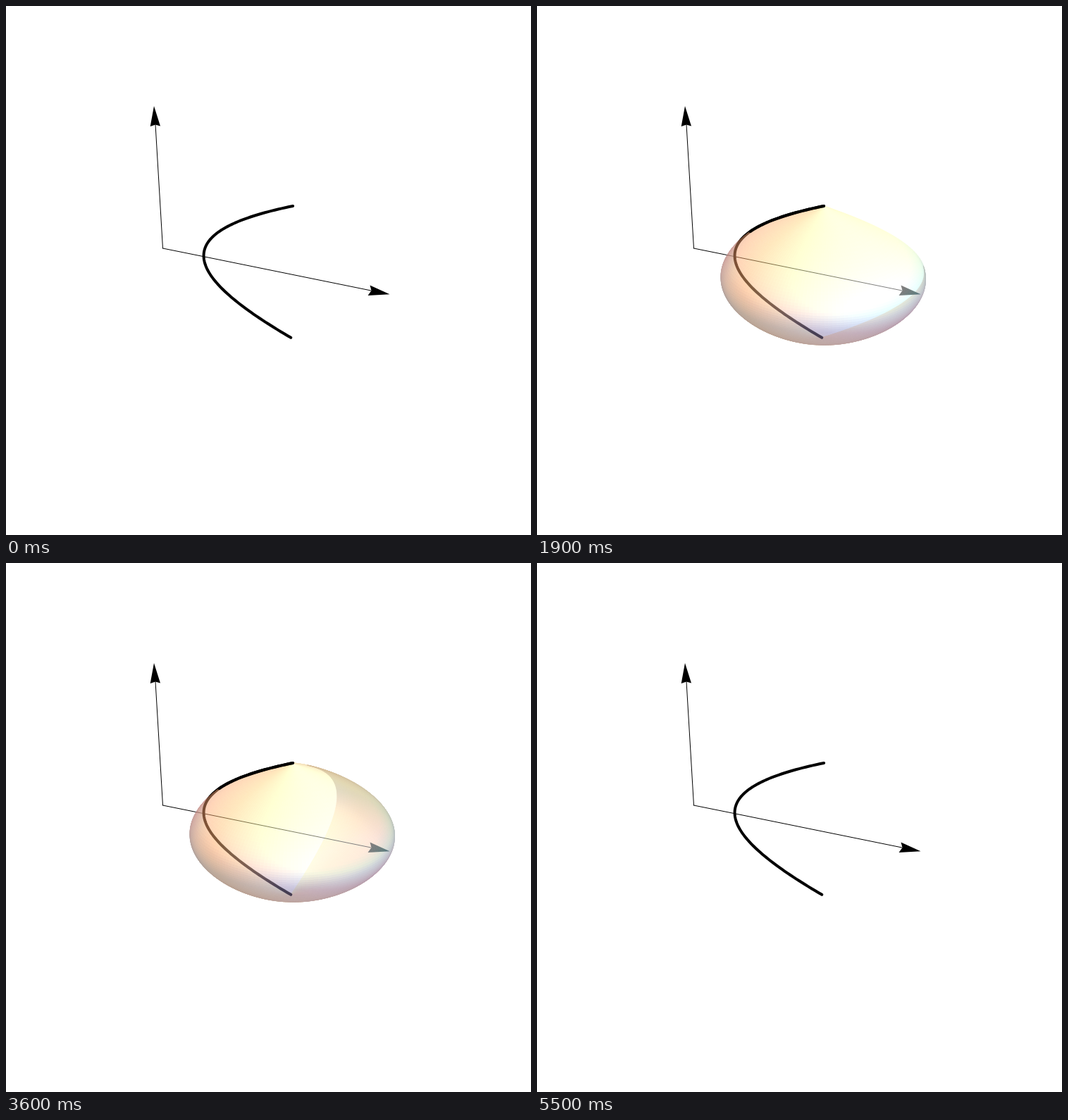
Animation, 745 px wide and 751 px high, one loop 6 s. Source, as an HTML page with a canvas:

```html
<!DOCTYPE html>
<html lang="en">
<head>
<meta charset="utf-8">
<title>Surface of revolution</title>
<style>
html, body { margin: 0; width: 100%; height: 100%; overflow: hidden; background: #fff; }
canvas { display: block; width: 745px; height: 751px; }
</style>
</head>
<body>
<canvas id="stage" width="745" height="751"></canvas>
<script>
const W = 745, H = 751, RAD = Math.PI / 180;
const ctx = document.getElementById('stage').getContext('2d');

// Camera: tilt, focal length, depth of the solid's centre, principal point
const TILT = 24.7 * RAD, FOCAL = 1107, DEPTH = 15.36, CX = 369, CY = 375.5;
const START = 205.9 * RAD, ZMAX = Math.SQRT2, ZSCALE = 1.01;
const SIN = Math.sin(TILT), COS = Math.cos(TILT);
const OPACITY = 0.5, ROWS = 64;

// World (right, near, height) to camera (right, up, toward the viewer)
const turn = (x, y, z) => [x, z * COS - y * SIN, z * SIN + y * COS];
const dot = (a, b) => a[0] * b[0] + a[1] * b[1] + a[2] * b[2];
const unit = v => { const n = Math.hypot(...v); return v.map(c => c / n); };

function place(x, y, z) {
  const p = turn(x, y, z * ZSCALE);
  return [p[0] + 0.509, p[1] - 0.0765, p[2]];
}
function project(p) {
  const s = FOCAL / (DEPTH - p[2]);
  return [CX + p[0] * s, CY - p[1] * s];
}
// Profile r = 2 - z^2 turned around the vertical line
function onSurface(angle, z) {
  const r = 2 - z * z;
  return place(r * Math.cos(angle), r * Math.sin(angle), z);
}
const normalAt = (angle, z) => unit(turn(Math.cos(angle), Math.sin(angle), 2 * z));
const facing = (n, p) => dot(n, [-p[0], -p[1], DEPTH - p[2]]) > 0;

const AMBIENT = [0.4, 0.2, 0.2];
const LIGHTS = [
  { dir: [1.5, -0.5, 1.5], rgb: [0, 0.18, 0.5] },
  { dir: [1.5, 1.5, 1.5], rgb: [0.18, 0.5, 0.18] },
  { dir: [-0.5, 1.5, 1.5], rgb: [0.5, 0.18, 0] }
].map(l => {
  const dir = unit(l.dir);
  return { dir, rgb: l.rgb, half: unit([dir[0], dir[1], dir[2] + 1]) };
});

function shade(n) {
  const c = AMBIENT.slice();
  for (const l of LIGHTS) {
    const k = Math.max(0, dot(n, l.dir)) + 0.5 * Math.max(0, dot(n, l.half)) ** 3;
    l.rgb.forEach((v, i) => c[i] += v * k);
  }
  return 'rgb(' + c.map(v => Math.round(255 * Math.min(1, 0.25 + 0.75 * v))) + ')';
}

function makeLayer() {
  const c = document.createElement('canvas');
  c.width = W;
  c.height = H;
  const g = c.getContext('2d');
  g.lineWidth = 0.8;
  g.lineJoin = 'round';
  return g;
}
const inner = makeLayer(), outer = makeLayer();

function trace(g, pts) {
  g.beginPath();
  pts.forEach((p, i) => i ? g.lineTo(p[0], p[1]) : g.moveTo(p[0], p[1]));
}

function buildSurface(sweep) {
  inner.clearRect(0, 0, W, H);
  outer.clearRect(0, 0, W, H);
  const cols = Math.ceil(sweep / (2 * RAD));
  const da = sweep / cols, dz = 2 * ZMAX / ROWS;
  for (let i = 0; i < cols; i++) {
    const a = START - i * da, b = a - da;
    for (let j = 0; j < ROWS; j++) {
      const z = -ZMAX + j * dz;
      let n = normalAt((a + b) / 2, z + dz / 2);
      const front = facing(n, onSurface((a + b) / 2, z + dz / 2));
      if (!front) n = n.map(v => -v);
      const g = front ? outer : inner;
      g.fillStyle = g.strokeStyle = shade(n);
      trace(g, [[a, z], [b, z], [b, z + dz], [a, z + dz]].map(q => project(onSurface(...q))));
      g.closePath();
      g.fill();
      g.stroke();
    }
  }
}

const profile = [], visible = [];
for (let i = 0; i <= 100; i++) {
  const z = ZMAX * (1 - i / 50), p = onSurface(START, z), q = project(p);
  profile.push(q);
  if (facing(normalAt(START, z), p)) visible.push(q);
}

function line(pts, width) {
  trace(ctx, pts);
  ctx.lineWidth = width;
  ctx.stroke();
}
function head(pts) {
  trace(ctx, pts);
  ctx.fill();
}
function blend(layer) {
  ctx.globalAlpha = OPACITY;
  ctx.drawImage(layer.canvas, 0, 0);
  ctx.globalAlpha = 1;
}

const ORIGIN = [222.5, 344], VERTEX = profile[50];

function draw(step) {
  const sweep = step ? 14.65 * (step - 0.92) * RAD : 0;
  ctx.fillStyle = '#fff';
  ctx.fillRect(0, 0, W, H);
  ctx.fillStyle = ctx.strokeStyle = '#000';
  ctx.lineCap = ctx.lineJoin = 'round';
  if (sweep) buildSurface(sweep);

  line([ORIGIN, [212, 168]], 1);
  head([[210, 142], [219, 170.5], [212, 168.5], [204.7, 171]]);
  line([ORIGIN, VERTEX], 1);
  if (sweep) blend(inner);
  line([VERTEX, [518, 404]], 1);
  head([[544.5, 409.3], [516.5, 396.5], [518.5, 404], [513.5, 411]]);
  line(profile, 4);
  if (sweep) {
    blend(outer);
    line(visible, 4);
  }
}

function stepAt(ms) {
  const s = Math.floor(ms % 6000 / 100);
  if (s < 5) return 0;
  return s < 31 ? Math.min(25, s - 4) : Math.max(0, 55 - s);
}

let shown = -1;
function tick() {
  const step = stepAt(performance.now());
  if (step !== shown) draw(shown = step);
  requestAnimationFrame(tick);
}
tick();
</script>
</body>
</html>
```
